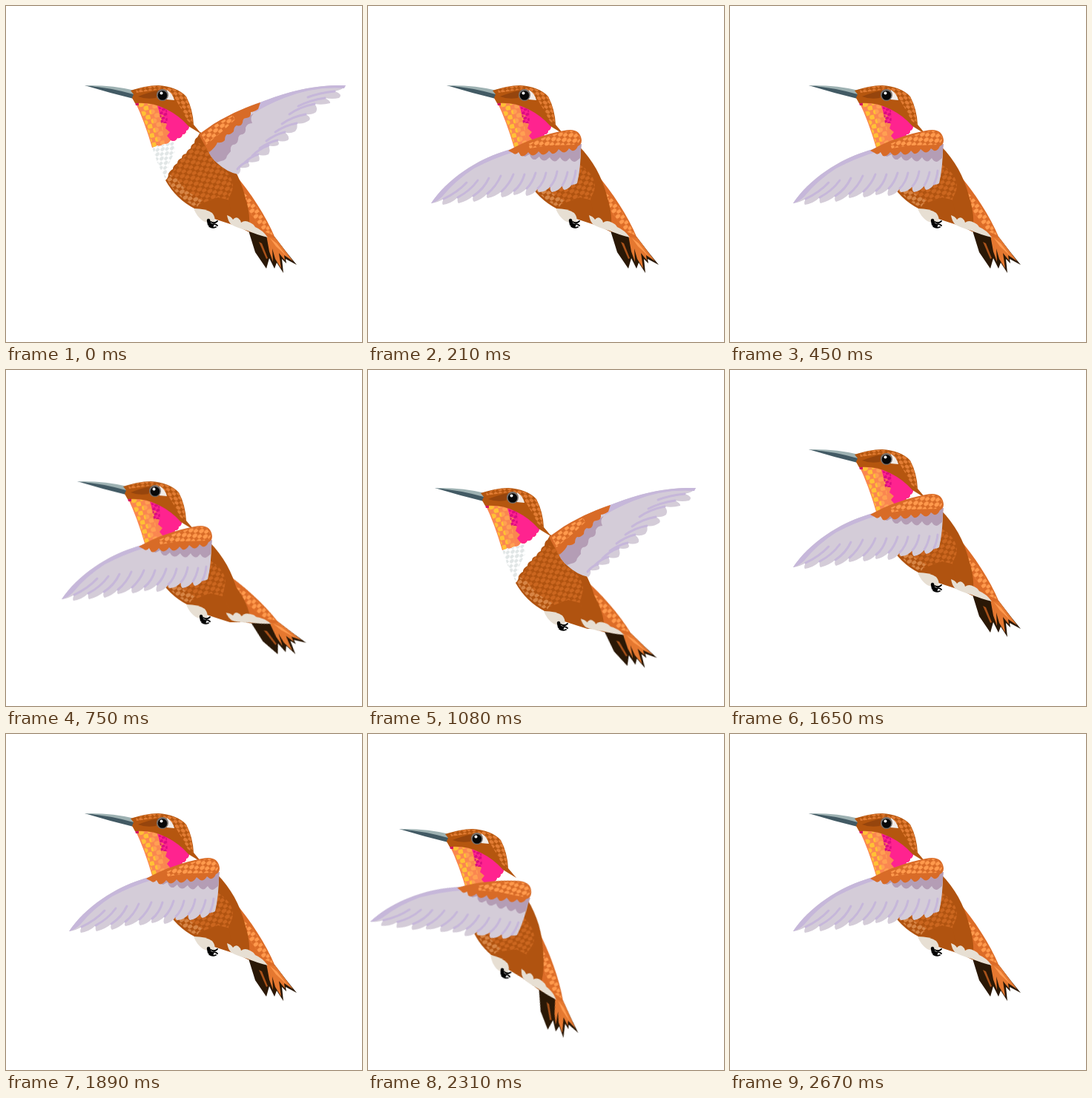
These frames come from a looping animation (480 by 453 pixels, 2700 ms). An HTML page without scripts:

```html
<!DOCTYPE html>
<html lang="en">
<head>
<meta charset="utf-8">
<title>Hummingbird</title>
<style>
html, body { margin: 0; width: 100%; height: 100%; overflow: hidden; background: #fff; }
svg { display: block; width: 100%; height: 100%; }
.bird, .torso, .tail { animation: 2.7s infinite; }
.bird { animation-name: fly; }
.torso { animation-name: lean; transform-origin: 225px 170px; }
.tail { animation-name: drag; transform-origin: 311px 250px; }
.wing { animation: flap 60ms -1ms step-end infinite; }
.down { animation-delay: -31ms; }
@keyframes flap { 0% { visibility: visible } 50%, 100% { visibility: hidden } }
@keyframes fly {
  0%, 19.5% { transform: none; animation-timing-function: ease-in }
  27.78% { transform: translate(-10px, 43px); animation-timing-function: ease-out }
  34%, 40.7% { transform: translate(-16px, 52px); animation-timing-function: ease-in-out }
  51.5%, 71.5% { transform: none; animation-timing-function: ease-in }
  78.9% { transform: translate(-38px, 9px); animation-timing-function: ease-out }
  84.8%, 88.5% { transform: translate(-64px, 21px); animation-timing-function: ease-in-out }
  98.2%, 100% { transform: none }
}
@keyframes lean {
  0%, 73% { transform: none; animation-timing-function: ease-in }
  80% { transform: rotate(4deg); animation-timing-function: ease-out }
  85.3%, 88.5% { transform: rotate(13deg); animation-timing-function: ease-in-out }
  98.2%, 100% { transform: none }
}
@keyframes drag {
  0%, 19.5% { transform: none }
  27.78% { transform: rotate(-15deg) }
  34%, 39% { transform: rotate(-6deg) }
  41.1% { transform: rotate(-9deg) }
  51.5%, 85.6% { transform: none }
  88% { transform: rotate(2deg) }
  92%, 100% { transform: none }
}
</style>
</head>
<body>
<svg viewBox="0 0 480 453">
<defs>
  <g id="scales" fill="currentColor">
    <ellipse cx="3.2" cy="2.5" rx="3.7" ry="2.4"/>
    <ellipse cx="8.700" cy="7" rx="3.7" ry="2.4"/>
  </g>
  <pattern id="chest" width="11" height="9" patternUnits="userSpaceOnUse" patternTransform="rotate(-30)" color="#cb661f"><use href="#scales"/></pattern>
  <pattern id="flank" width="11" height="9" patternUnits="userSpaceOnUse" patternTransform="rotate(-30)" color="#d78545"><use href="#scales"/></pattern>
  <pattern id="throat" width="11" height="9" patternUnits="userSpaceOnUse" patternTransform="rotate(-45) scale(.9)" color="#e1e6e6"><use href="#scales"/></pattern>
  <pattern id="gold" width="11" height="9" patternUnits="userSpaceOnUse" patternTransform="translate(2 0) rotate(-12) scale(1.1 1.4)" color="#ffc135"><use href="#scales"/></pattern>
  <pattern id="coral" width="11" height="9" patternUnits="userSpaceOnUse" patternTransform="translate(2 0) rotate(-12) scale(1.1 1.4)" color="#ffa052"><use href="#scales"/></pattern>
  <pattern id="rose" width="11" height="9" patternUnits="userSpaceOnUse" patternTransform="rotate(-20) scale(.8)" color="#db0c80"><use href="#scales"/></pattern>
  <pattern id="crown" width="11" height="9" patternUnits="userSpaceOnUse" patternTransform="rotate(35) scale(.9)" color="#e27c33"><use href="#scales"/></pattern>
  <pattern id="amber" width="11" height="9" patternUnits="userSpaceOnUse" patternTransform="rotate(-35)" color="#ff9a4d"><use href="#scales"/></pattern>
</defs>

<g class="bird">
  <g class="torso">
    <g class="tail">
      <path fill="#2a1806" d="M327,303L352,308L362,311L379,333L392,349L377,341L378,347L372,341L374,360L365,346L362,354L355,340L351,354L336,332Z"/>
      <path fill="#a9521a" d="M341,318l4,2l8,20l-2,1z"/>
      <path fill="#e57830" d="M351,309L363,312L387,344L375,336L376,343L368,333L371,354L363,341L359,327L360,345L355,331Z"/>
      <path fill="#ff9b50" d="M356,313l9,7l14,18l-15,-14z"/>
      <path fill="#dc6c27" d="M308,226C330,252 350,282 363,313L351,311L318,292L300,250Z"/>
      <path fill="url(#amber)" d="M318,250C335,262 350,288 360,309L348,304L327,276Z"/>
    </g>
    <path fill="#fff" d="M195,188L246,160L264,173L225,232L215,236Q202,212 195,188Z"/>
    <path fill="url(#throat)" d="M197,190L213,187L226,183L228,196L220,212L215,233Q203,212 197,190Z"/>
    <path fill="#b05310" d="M262,170C283,184 302,206 312,228Q328,262 326,297L312,297Q296,292 281,287Q267,281 254,273Q229,260 215,235Q219,232 219,226Q222,221 225,220Q225,215 231,212Q231,207 237,205Q237,200 243,199Q244,194 249,192Q249,187 254,185Q254,179 258,177Z"/>
    <path fill="url(#chest)" d="M257,184Q276,188 282,212Q306,225 306,244L302,262L286,258L261,267Q232,257 219,235Q228,212 257,184Z"/>
    <path fill="url(#flank)" d="M219,226L230,233L243,249L264,262L257,272Q230,257 217,235Z"/>
    <path class="tail" fill="#b05310" d="M311,236Q330,264 328,297L350,309L326,304L306,294L300,260Z"/>
    <path class="tail" fill="#e7dfd3" d="M298,282Q304,284 306,288Q309,284 313,286Q316,288 317,292Q322,288 329,292Q334,294 336,298Q346,302 353,312Q337,308 326,303Q308,298 303,294Q299,289 298,282Z"/>
    <path fill="#e7dfd3" d="M253,273Q270,273 278,279Q283,285 281,291Q274,294 266,290Q257,284 253,273Z"/>
    <g fill="none" stroke="#000" stroke-linecap="round">
      <path stroke-width="4.500" d="M273,289l1,5l4,2"/>
      <path stroke-width="1.800" d="M276,291q5,3 9,-1M277,295q5,-2 8,1M274,297q4,3 9,1"/>
    </g>
  </g>

  <path fill="#fa8650" d="M174,129Q195,129 212,136Q236,145 247,161Q247,167 243,168Q243,173 238,173Q237,179 231,178Q228,184 222,181Q218,188 212,185Q209,190 204,188L197,191Q187,156 174,129Z"/>
  <path fill="url(#gold)" d="M178,131L194,132Q199,160 207,188L198,191Q188,157 178,131Z"/>
  <path fill="url(#coral)" d="M194,132L208,136L214,186L206,188Z"/>
  <path fill="#ff238f" d="M204,134Q234,143 247,161Q247,167 243,168Q243,173 238,173Q237,179 231,178Q228,184 222,181L217,175L221,170L215,165L217,159L209,155L214,149L207,145Z"/>
  <path fill="url(#rose)" d="M206,136L217,139L218,158L209,158Z"/>
  <path fill="#d51662" d="M173,127h6v7h-4z"/>

  <path fill="#425a64" d="M106,107Q143,109 174,119L172,125Q139,117 106,107Z"/>
  <path fill="#9db1b2" d="M106,107Q142,106 174,114L172,119Q140,110 106,107Z"/>
  <path fill="#b5560f" d="M168,114C181,110 193,107 205,107C221,108 235,113 243,122Q252,139 253,160L264,173L246,162Q234,148 216,139Q197,129 174,131L170,124L172,119Z"/>
  <path fill="#96450d" d="M178,122Q193,116 205,114L202,124Q188,126 178,122Z"/>
  <path fill="url(#crown)" d="M175,113Q193,107 207,108Q233,111 243,123Q251,138 252,160L245,155L237,140L225,120L211,112L176,117Z"/>
  <path fill="#f2ece8" d="M217,113Q225,118 227,127L216,126Z"/>
  <circle cx="211" cy="120" r="8" fill="#77716d"/>
  <circle cx="211" cy="120.500" r="6.300" fill="#080808"/>
  <circle cx="209.500" cy="117.500" r="2" fill="#fff"/>

  <g class="torso">
    <g class="wing up">
      <path fill="#d4ccd8" d="M262,172L280,159C310,142 330,134 343,130C385,113 420,106 458,107Q456,112 443,115Q455,119 449,124Q440,126 430,124Q438,128 437,131Q426,134 416,132Q421,138 418,143Q412,147 404,146Q412,150 409,154Q400,160 392,158Q394,164 390,169Q382,173 376,170Q384,177 380,181Q372,184 366,181Q370,186 366,188Q360,190 354,188Q357,195 354,200Q346,203 340,200Q343,206 341,209Q333,212 326,210Q330,215 327,217Q321,219 316,218Q317,224 313,227Q298,224 285,212Q275,203 273,195Z"/>
      <path fill="#c6b7da" d="M340,131C385,113 420,106 458,107L456,111Q415,108 375,124Q350,134 335,144Z"/>
      <path fill="none" stroke="#c6b7da" stroke-width="3" stroke-linecap="round" d="M443,115q-20,2-36,8M430,124q-20,3-36,11M416,132q-20,4-34,14M404,146q-18,3-32,13M392,158q-16,3-29,12M376,170q-13,3-25,12M366,181q-13,3-24,11M354,188q-12,4-22,14M340,200q-10,3-18,11M326,210q-8,2-14,10"/>
      <path fill="#b49db5" d="M334,145Q328,150 332,158Q325,158 323,164Q324,171 319,173Q313,173 313,180Q312,187 306,187Q302,189 303,196Q300,199 298,202Q297,208 290,209L284,211Q275,203 273,195L298,164Z"/>
      <path fill="#d86b27" d="M260,173L280,159C307,143 327,135 343,130L340,139Q334,143 330,143Q331,150 324,151Q319,151 319,157Q317,163 311,161Q307,163 307,169Q303,174 298,173Q295,175 295,181Q291,185 285,184Q283,190 274,197Q267,187 260,173Z"/>
      <path fill="url(#amber)" d="M264,174L282,160L306,147L309,153L292,169L270,187Z"/>
    </g>
    <g class="wing down">
      <path fill="#d4ccd8" d="M190,194C145,206 106,235 85,266Q94,265 102,260Q99,266 101,268Q113,266 121,258Q120,264 122,266Q134,263 142,256Q140,262 143,264Q153,261 161,253Q159,257 161,259Q172,257 180,250Q178,256 181,258Q191,256 197,249Q195,253 197,255Q207,253 214,246Q211,254 214,256Q224,254 229,246Q228,250 231,251Q241,250 246,243Q245,249 248,251Q258,249 262,242Q262,247 265,248Q272,246 275,240Q278,242 282,239Q287,218 287,190Z"/>
      <path fill="#c6b7da" d="M196,192C145,206 106,235 85,266Q93,264 100,257Q118,235 143,219Q170,205 196,197Z"/>
      <path fill="none" stroke="#c6b7da" stroke-width="3" stroke-linecap="round" d="M102,260q19,-9 31,-22M121,258q17,-9 27,-23M142,256q14,-9 21,-24M161,253q12,-10 18,-24M180,250q11,-10 16,-23M197,249q10,-8 14,-22M214,246q8,-8 12,-21M229,246q8,-8 11,-21M246,243q7,-8 9,-20M262,242q5,-8 7,-18M275,240q4,-8 5,-18"/>
      <path fill="#b49db5" d="M205,196Q207,203 212,203Q217,200 218,200Q220,208 226,207L231,203Q234,210 240,208L245,204Q249,211 254,209L259,204Q263,211 268,209L272,205Q276,212 281,209L286,205L288,186Z"/>
      <path fill="#d86b27" d="M189,195C214,181 239,173 264,168Q286,163 288,181Q288,187 283,189Q280,196 275,195L271,192Q267,199 262,197L257,193Q253,200 248,199L244,195Q239,202 234,200L230,196Q225,203 220,201L216,197Q211,204 206,202L203,197Q199,202 195,198Z"/>
      <path fill="url(#amber)" d="M216,186Q244,173 272,168Q286,169 286,181L282,187L244,188L218,192Z"/>
    </g>
  </g>
</g>
</svg>
</body>
</html>
```
